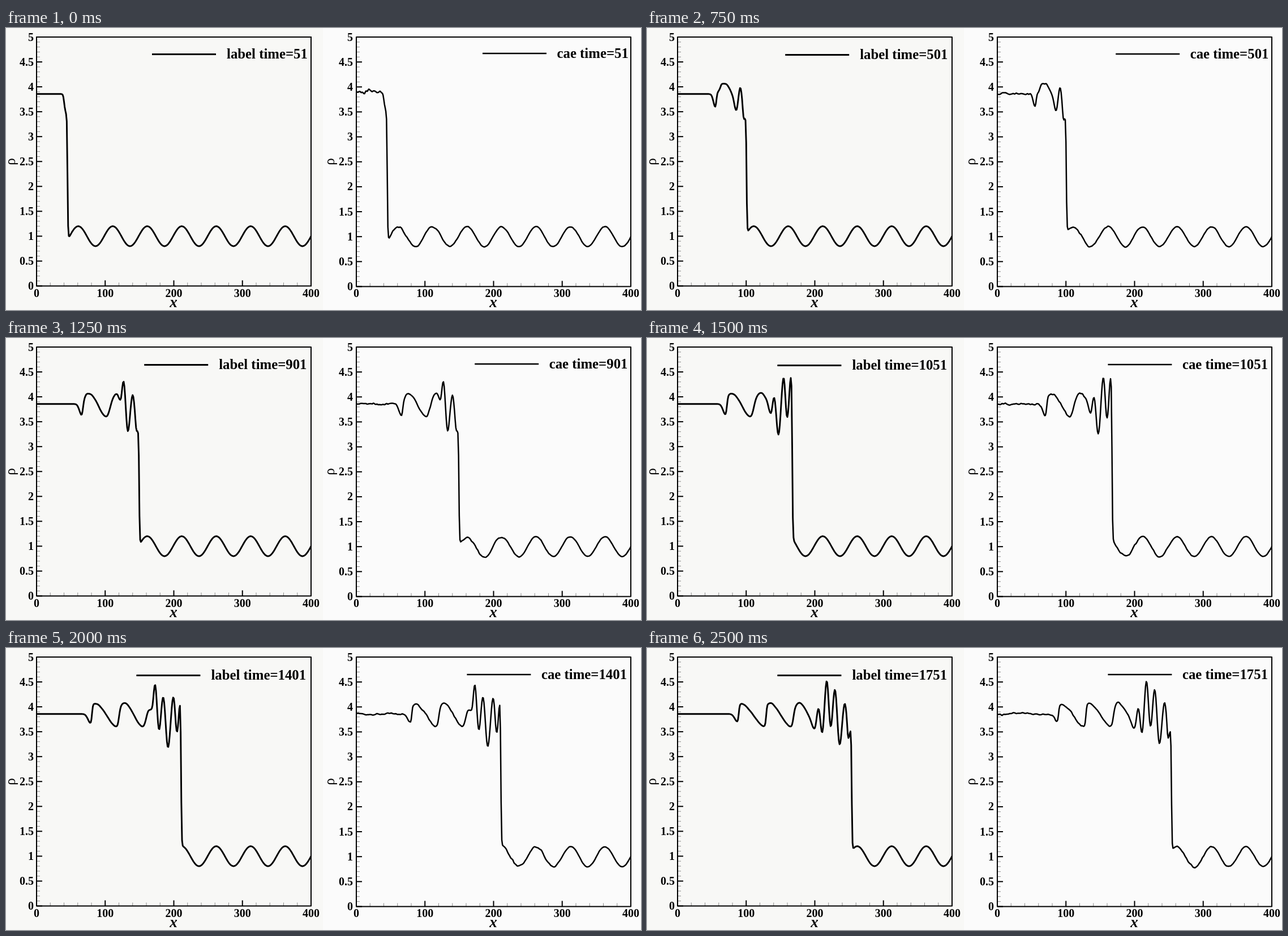
An HTML page with a canvas for the animation above (2750 ms loop, 1122 by 499 pixels).

```html
<!DOCTYPE html>
<html lang="en">
<head>
<meta charset="utf-8">
<title>Shock and density wave</title>
<style>
  html, body { margin: 0; width: 100%; height: 100%; overflow: hidden; background: #f9f9f8; }
  canvas { display: block; }
</style>
</head>
<body>
<canvas id="stage" width="1122" height="499"></canvas>
<script>
const ctx = document.getElementById('stage').getContext('2d');
const FRAME_MS = 250;
const STEPS = [51, 151, 301, 501, 701, 901, 1051, 1251, 1401, 1601, 1751];
const SERIF = '"Liberation Serif", "Times New Roman", serif';

// --- 1D Euler equations: a Mach 3 shock running into a sine density wave ---
const CELLS = 400, GHOST = 3, SIZE = CELLS + 2 * GHOST;
const DX = 10 / CELLS, GAMMA = 1.4;
const BLOCK = 50, SUBSTEPS = 16, DT = BLOCK * 0.000863 / SUBSTEPS;
const RHO_LEFT = 3.857143, U_LEFT = 2.629369, P_LEFT = 10.33333;
const fields = () => [0, 1, 2].map(() => new Float64Array(SIZE));

const pressure = (rho, mom, energy) => (GAMMA - 1) * (energy - mom * mom / rho / 2);

function initialState() {
  const state = fields();
  for (let i = 0; i < SIZE; i++) {
    const x = -5 + (i - GHOST + 1) * DX;
    const [rho, u, p] = x < -4.01 ? [RHO_LEFT, U_LEFT, P_LEFT]
                                  : [1 + 0.2 * Math.sin(5 * x), 0, 1];
    state[0][i] = rho;
    state[1][i] = rho * u;
    state[2][i] = p / (GAMMA - 1) + rho * u * u / 2;
  }
  return state;
}

// Fifth-order weighted reconstruction at the face between c and d
function weno(a, b, c, d, e) {
  const p = a - 2 * b + c, q = b - 2 * c + d, r = c - 2 * d + e;
  const p1 = a - 4 * b + 3 * c, q1 = b - d, r1 = 3 * c - 4 * d + e;
  const s0 = 13 / 12 * p * p + p1 * p1 / 4 + 1e-12;
  const s1 = 13 / 12 * q * q + q1 * q1 / 4 + 1e-12;
  const s2 = 13 / 12 * r * r + r1 * r1 / 4 + 1e-12;
  const tau = Math.abs(s0 - s2);
  const w0 = 0.1 * (1 + (tau / s0) * (tau / s0));
  const w1 = 0.6 * (1 + (tau / s1) * (tau / s1));
  const w2 = 0.3 * (1 + (tau / s2) * (tau / s2));
  return (w0 * (2 * a - 7 * b + 11 * c) + w1 * (5 * c - b + 2 * d) +
          w2 * (2 * c + 5 * d - e)) / (6 * (w0 + w1 + w2));
}

const flux = fields(), plus = new Float64Array(SIZE), minus = new Float64Array(SIZE);
const face = new Float64Array(SIZE);

// One Runge-Kutta stage: keep * base + (1 - keep) * (state + DT * change)
function stage(state, base, keep) {
  const [rho, mom, energy] = state;
  let speed = 0;
  for (let i = 0; i < SIZE; i++) {
    const u = mom[i] / rho[i];
    const p = pressure(rho[i], mom[i], energy[i]);
    flux[0][i] = mom[i];
    flux[1][i] = mom[i] * u + p;
    flux[2][i] = (energy[i] + p) * u;
    speed = Math.max(speed, Math.abs(u) + Math.sqrt(GAMMA * p / rho[i]));
  }
  return state.map((v, k) => {
    const next = v.slice(), f = flux[k];
    for (let i = 0; i < SIZE; i++) {
      plus[i] = (f[i] + speed * v[i]) / 2;
      minus[i] = (f[i] - speed * v[i]) / 2;
    }
    for (let i = GHOST - 1; i < SIZE - GHOST; i++) {
      face[i] = weno(plus[i - 2], plus[i - 1], plus[i], plus[i + 1], plus[i + 2]) +
                weno(minus[i + 3], minus[i + 2], minus[i + 1], minus[i], minus[i - 1]);
    }
    for (let i = GHOST; i < SIZE - GHOST; i++) {
      const moved = v[i] - DT / DX * (face[i] - face[i - 1]);
      next[i] = keep * base[k][i] + (1 - keep) * moved;
    }
    return next;
  });
}

// Density with the short entropy waves behind the shock damped; sound waves stay as they are
const ENTROPY_SCALE = 0.62;
function dampedDensity([rho, mom, energy]) {
  const density = Array.from(rho, (value, i) => {
    const p = pressure(value, mom[i], energy[i]);
    const sound = RHO_LEFT * (p / P_LEFT) ** (1 / GAMMA);
    const behind = Math.min(1, Math.max(0, (p - 4) / 3));
    return value + behind * (1 - ENTROPY_SCALE) * (sound - value);
  });
  return [...density.slice(GHOST, GHOST + CELLS), 1];
}

function simulate() {
  let state = initialState(), block = 0;
  return STEPS.map(step => {
    for (; block < (step - 1) / BLOCK; block++) {
      for (let n = 0; n < SUBSTEPS; n++) {
        const first = stage(state, state, 0);
        const second = stage(first, state, 3 / 4);
        state = stage(second, state, 1 / 3);
      }
    }
    return dampedDensity(state);
  });
}

// --- The learned curve: the same density with seeded ripples, strongest early and near the shock ---
const random = n => { const v = Math.sin(n * 127.1 + 11.7) * 43758.5453; return v - Math.floor(v); };
function ripple(x, seed) {
  const cell = Math.floor(x), part = x - cell;
  return (random(cell + seed) * (1 - part) + random(cell + 1 + seed) * part) * 2 - 1;
}

function predict(rho, step) {
  const shock = 39 + 0.1226 * step;
  const early = Math.exp(-step / 150);
  return rho.map((value, x) => {
    if (x === CELLS) return value;
    const behind = x < shock;
    const strength = behind ? 0.025 + 0.04 * early : 0.008 + 0.03 * Math.exp((shock - x) / 50);
    const offset = behind ? 0.07 * early : 0;
    return value + offset +
      strength * (0.5 * ripple(x / 2.3, step) + 0.8 * ripple(x / 6, step + 500));
  });
}

// --- Drawing ---
const PLOTS = [
  { name: 'label', left: 54, bottom: 456.5, labelX: 49, rhoX: 16, legendX: 258, textX: 390, legendY: 46.5, weight: 2.9, legendWeight: 3 },
  { name: 'cae', left: 619, bottom: 457.5, labelX: 613, rhoX: 580, legendX: 842, textX: 973.5, legendY: 45, weight: 2.5, legendWeight: 2.6 }
];
const WIDTH = 485, TOP = 16;

function line(x1, y1, x2, y2, width, color = '#000') {
  ctx.strokeStyle = color;
  ctx.lineWidth = width;
  ctx.beginPath();
  ctx.moveTo(x1, y1);
  ctx.lineTo(x2, y2);
  ctx.stroke();
}

function text(string, x, y, font, align) {
  ctx.font = `${font} ${SERIF}`;
  ctx.textAlign = align;
  ctx.fillText(string, x, y);
}

function drawPlot(plot, rho, step) {
  const { left, bottom } = plot;
  const toX = x => left + x * WIDTH / 400;
  const toY = y => bottom - y * (bottom - TOP) / 5;
  ctx.fillStyle = '#000';

  for (let n = 0; n <= 50; n++) {
    const y = toY(n / 10);
    if (n % 5) {
      line(left, y, left + 6, y, 1, '#888');
    } else {
      line(left, y, left + 10, y, 2);
      text(n / 10, plot.labelX, y + 6.5, 'bold 20px', 'right');
    }
  }
  for (let x = 0; x <= 400; x += 20) {
    if (x % 100) {
      line(toX(x), bottom, toX(x), bottom - 6, 1, '#888');
    } else {
      line(toX(x), bottom, toX(x), bottom - 10, 2);
      text(x, toX(x), 475.5, 'bold 20px', 'center');
    }
  }
  text('x', left + 242, 494, 'italic bold 27px', 'center');
  ctx.save();
  ctx.translate(plot.rhoX, 236.5);
  ctx.rotate(-Math.PI / 2);
  text('ρ', 0, 0, '25px', 'center');
  ctx.restore();

  ctx.strokeStyle = '#000';
  ctx.lineWidth = 2;
  ctx.strokeRect(left, TOP, WIDTH, bottom - TOP);

  ctx.lineWidth = plot.weight;
  ctx.lineJoin = 'round';
  ctx.beginPath();
  rho.forEach((value, x) => ctx.lineTo(toX(x), toY(value)));
  ctx.stroke();

  // A longer number pushes the legend to the left and slightly down
  const extra = String(step).length - 2;
  const shift = -13.8 * extra, y = plot.legendY + extra;
  line(plot.legendX + shift, y, plot.legendX + 113 + shift, y, plot.legendWeight);
  text(`${plot.name} time=${step}`, plot.textX + shift, y + 7.5, 'bold 24.8px', 'left');
}

const exact = simulate();
const curves = exact.map((rho, n) => [rho, predict(rho, STEPS[n])]);
const start = performance.now();
let shown = -1;

function draw() {
  const frame = Math.floor((performance.now() - start) / FRAME_MS) % STEPS.length;
  if (frame !== shown) {
    shown = frame;
    ctx.fillStyle = '#f8f8f6';
    ctx.fillRect(0, 0, 560, 499);
    ctx.fillStyle = '#fbfbfb';
    ctx.fillRect(560, 0, 562, 499);
    PLOTS.forEach((plot, n) => drawPlot(plot, curves[frame][n], STEPS[frame]));
  }
  requestAnimationFrame(draw);
}
draw();
</script>
</body>
</html>
```
